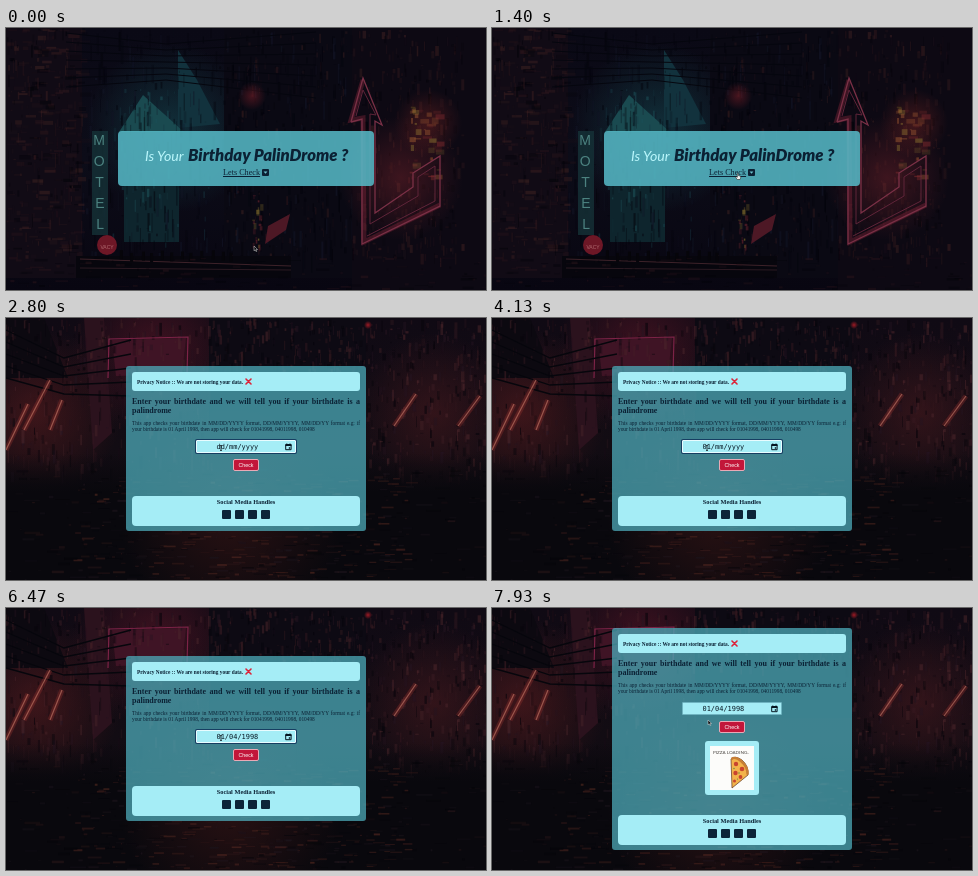
An HTML page with a canvas for the animation above (8 s loop, 480 by 262 pixels).

```html
<!DOCTYPE html>
<html lang="en">
<head>
<meta charset="utf-8">
<title>Birthday palindrome</title>
<style>
html, body { margin: 0; width: 100%; height: 100%; overflow: hidden; background: #0b0a12; }
#stage { position: relative; width: 480px; height: 262px; overflow: hidden; color: #0b2134;
  font: 5.33px/1 "Liberation Serif", serif; }
#stage > *, #panel > * { position: absolute; box-sizing: border-box; }
canvas { left: 0; top: 0; }
#intro { left: 112px; top: 103px; width: 256px; height: 55px; border-radius: 4px; background: rgba(86, 184, 198, .87); }
#intro span { position: absolute; white-space: nowrap; line-height: 1; }
.lead { left: 27px; top: 17.5px; font: italic 14.2px Lato, sans-serif; color: #b9f6fb; }
.name { left: 70px; top: 15.5px; font: italic 900 16.7px Lato, sans-serif; }
.link { left: 105px; top: 38px; font-size: 8.2px; text-decoration: underline; text-decoration-thickness: .7px; }
#intro svg { position: absolute; left: 143.5px; top: 38px; }
#panel { left: 120px; width: 240px; border-radius: 3px; background: rgba(78, 172, 187, .74); }
.light { background: #a5edf6; border-radius: 3px; }
#notice { left: 6px; top: 6px; width: 228px; height: 19px; padding: 7.6px 5px; font-weight: bold; white-space: nowrap; }
#notice svg { position: absolute; left: 112.5px; top: 6.3px; }
h1 { left: 6px; top: 31px; width: 228px; margin: 0; font-size: 8px; line-height: 9px; }
p { left: 6px; top: 54.2px; width: 228px; margin: 0; line-height: 6px; }
.full { display: block; white-space: nowrap; text-align: justify; text-align-last: justify; }
#field { left: 70px; top: 74px; width: 100px; height: 13px; border: .7px solid #6fb4c1; border-radius: 1px; }
#field.focus { border-color: #e8fcff; box-shadow: 0 0 0 1px #173e62; }
#field span { position: absolute; left: 19.5px; top: 2.3px; font: 6.95px/8px "DejaVu Sans Mono", monospace; color: #071722; white-space: pre; }
#field svg { position: absolute; left: 88px; top: 2px; }
#check { left: 107px; top: 93px; width: 26px; height: 12px; border: .7px solid #e9a9b6; border-radius: 2px;
  text-align: center; font: 5.3px/10.6px "Liberation Sans", sans-serif; }
#loader { left: 93px; top: 113px; width: 54px; height: 54px; }
#loader svg { position: absolute; left: 5px; top: 5px; }
#social { left: 6px; bottom: 5px; width: 228px; height: 30px; border-radius: 4px; text-align: center; }
#social b { display: block; margin-top: 3px; font-size: 6.3px; }
#social i { display: inline-block; width: 9.4px; height: 9.4px; margin: 4.8px 1.05px 0; border-radius: 1px; background: #0c2438; }
#status { left: 0; bottom: 0; width: 71px; height: 7px; padding: 1px 2px; background: #292a2e; color: #c8c9cc;
  font: 4.65px/5px "Liberation Sans", sans-serif; white-space: nowrap; }
#cursor { left: 0; top: 0; overflow: visible; }
</style>
</head>
<body>
<div id="stage">
  <canvas id="city" width="480" height="262"></canvas>
  <canvas id="street" width="480" height="262"></canvas>

  <div id="intro">
    <span class="lead">Is Your</span><span class="name">Birthday PalinDrome ?</span>
    <span class="link">Lets Check</span>
    <svg width="7" height="7"><rect width="7" height="7" rx="1" fill="#0b2134"/><path d="M1.6 2.5h3.8L3.5 4.8z" fill="#6fc3cf"/></svg>
  </div>

  <div id="panel">
    <div id="notice" class="light">Privacy Notice :: We are not storing your data.
      <svg width="7" height="7"><path d="M1 1 6 6M6 1 1 6" stroke="#dd2339" stroke-width="1.6" stroke-linecap="round"/></svg>
    </div>
    <h1><span class="full">Enter your birthdate and we will tell you if your birthdate is a</span>palindrome</h1>
    <p><span class="full">This app checks your birthdate in MM/DD/YYYY format, DD/MM/YYYY, MM/DD/YY format e.g: if</span>your birthdate is 01 April 1998, then app will check for 01041998, 04011998, 010498</p>
    <div id="field" class="light"><span id="date"></span>
      <svg width="7" height="8"><path d="M.7 1.5h5.4v5.2H.7zM1.8 .5v1M5 .5v1" fill="none" stroke="#071722"/><path d="M.5 1.5h6v1.6h-6zM3.8 4.3h1.4v1.4H3.8z" fill="#071722"/></svg>
    </div>
    <div id="check">Check</div>
    <div id="loader" class="light">
      <svg width="44" height="44">
        <rect width="44" height="44" fill="#fcfcfa"/>
        <text x="3" y="7.5" font-family="Lato, sans-serif" font-size="4.6" fill="#48433f">PIZZA LOADING..</text>
        <path d="M22 42 21 13Q25 9 32 14 39 20 38 29z" fill="#f3b34b" stroke="#5d3420" stroke-width=".7"/>
        <path d="M21.5 13Q25 10 31 15 38 21 37.5 28.5" fill="none" stroke="#c77e35" stroke-width="2.4"/>
        <g fill="#c8442f"><circle cx="26" cy="18" r="2.2"/><circle cx="32" cy="23" r="2.3"/><circle cx="25.5" cy="27" r="2.2"/><circle cx="30.5" cy="31" r="1.9"/><circle cx="24.5" cy="35" r="1.5"/></g>
        <g fill="#5c8a3a"><circle cx="29" cy="27" r=".7"/><circle cx="24" cy="22.5" r=".7"/><circle cx="27.5" cy="33" r=".6"/></g>
      </svg>
    </div>
    <div id="social" class="light"><b>Social Media Handles</b><i></i> <i></i> <i></i> <i></i></div>
  </div>

  <div id="status">127.0.0.1:5500/index.html#main-2</div>
  <svg id="cursor" width="8" height="8">
    <path id="arrow" d="M0 0v4.8l1.2-1 .8 1.8.9-.4-.8-1.7h1.5z" fill="#0a0a0c" stroke="#eee" stroke-width=".45"/>
    <path id="hand" d="M-.7-1.5q.7-.8 1.1.2v1.9l2 .6q.6.5.2 1.9l-.6 1.4h-2.8L-2.4 2.2q0-.8.8-.4l.9.5z" fill="#f4f4f4" stroke="#111" stroke-width=".5"/>
    <path id="beam" d="M-1-2.6Q0-2.6 0-2 0-2.6 1-2.6M0-2V2M-1 2.6Q0 2.6 0 2 0 2.6 1 2.6" fill="none" stroke="#0a0c10" stroke-width=".8"/>
  </svg>
</div>
<script>
const el = id => document.getElementById(id);
const ink = id => el(id).getContext('2d');

function seeded(seed) {
  return () => (seed = (seed * 16807) % 2147483647) / 2147483647;
}

function box(g, color, x, y, w, h) {
  g.fillStyle = color;
  g.fillRect(x, y, w, h);
}

function trace(g, pts) {
  g.beginPath();
  for (let i = 0; i < pts.length; i += 2) g.lineTo(pts[i], pts[i + 1]);
}

function shape(g, color, pts) {
  trace(g, pts);
  g.fillStyle = color;
  g.fill();
}

function line(g, color, width, pts) {
  trace(g, pts);
  g.strokeStyle = color;
  g.lineWidth = width;
  g.stroke();
}

function glow(g, rgb, alpha, x, y, r) {
  const fade = g.createRadialGradient(x, y, 0, x, y, r);
  fade.addColorStop(0, `rgba(${rgb},${alpha})`);
  fade.addColorStop(1, `rgba(${rgb},0)`);
  box(g, fade, x - r, y - r, 2 * r, 2 * r);
}

function wash(g, top, middle, bottom) {
  const fade = g.createLinearGradient(0, 0, 0, 262);
  [top, middle, bottom].forEach((c, i) => fade.addColorStop(i / 2, c));
  box(g, fade, 0, 0, 480, 262);
}

// Scattered strokes that give a wall or floor its rough surface.
function grain(g, rnd, count, colors, [x, y, w, h], sx, sy) {
  for (let i = 0; i < count; i++) {
    g.globalAlpha = .15 + rnd() * .45;
    box(g, colors[Math.floor(rnd() * colors.length)], x + rnd() * w, y + rnd() * h, .6 + rnd() * sx, .6 + rnd() * sy);
  }
  g.globalAlpha = 1;
}

function drawCity() {
  const g = ink('city'), rnd = seeded(71);
  wash(g, '#0a0915', '#0c0c18', '#080611');
  glow(g, '20,66,76', .65, 165, 100, 85);
  shape(g, '#12323d', [172, 22, 191, 52, 214, 96, 172, 100]);
  shape(g, '#1a4a50', [113, 104, 137, 67, 178, 104]);
  box(g, '#0e252d', 118, 158, 55, 56);
  box(g, '#0a0913', 218, 0, 128, 250);
  box(g, '#110b15', 0, 0, 76, 250);
  box(g, '#0d0913', 346, 0, 134, 262);

  const night = ['#04040b', '#05060f', '#131627'], brick = ['#04040a', '#2c161b', '#1d1119', '#3a1f20'];
  grain(g, rnd, 520, night, [76, 0, 270, 228], 2, 22);
  grain(g, rnd, 90, ['#1c5058', '#173642', '#090b15'], [104, 60, 100, 155], 2, 14);
  grain(g, rnd, 300, brick, [0, 0, 76, 228], 11, 4);
  grain(g, rnd, 130, brick, [0, 0, 76, 228], 1.5, 14);
  grain(g, rnd, 380, brick, [346, 0, 110, 230], 3, 11);
  grain(g, rnd, 230, brick, [218, 0, 125, 228], 2, 9);
  for (let i = 0; i < 7; i++) line(g, '#05060e', 1, [60, 5 + i * 9, 160, 16 + i * 6, 310, 4 + i * 11]);

  glow(g, '110,28,38', .6, 246, 68, 14);
  shape(g, '#4d1825', [262, 198, 284, 186, 280, 202, 259, 216]);
  grain(g, rnd, 22, ['#8d762f', '#7a2733'], [246, 165, 9, 55], 3, 6);
  glow(g, '120,36,44', .45, 395, 150, 62);
  glow(g, '140,42,38', .4, 422, 95, 34);
  grain(g, rnd, 42, ['#8c7430', '#7d2a2e', '#91522f'], [402, 78, 30, 74], 9, 6);
  line(g, 'rgba(150,40,65,.35)', 5, [357, 52, 345, 92, 357, 90, 358, 214, 434, 177]);
  line(g, '#7a3046', 1.3, [345, 94, 357, 50, 376, 97, 369, 93, 369, 185, 407, 159, 407, 145, 434, 128, 434, 178, 356, 216, 356, 91, 345, 94]);
  line(g, '#5f2439', 1, [350, 88, 357, 62, 370, 87, 364, 86, 364, 196, 412, 168, 412, 149, 429, 138, 429, 173, 361, 208]);

  box(g, 'rgba(22,52,58,.75)', 86, 103, 16, 104);
  g.fillStyle = '#4c8280';
  g.font = '14px "Liberation Sans", sans-serif';
  g.textAlign = 'center';
  [...'MOTEL'].forEach((c, i) => g.fillText(c, 93 + i * .3, 117 + i * 21));
  g.beginPath();
  g.arc(101, 217, 10, 0, 7);
  g.fillStyle = '#6d1726';
  g.fill();
  g.fillStyle = '#b06a70';
  g.font = '5px "Liberation Sans", sans-serif';
  g.fillText('VACY', 101, 221);

  box(g, '#07060d', 70, 228, 215, 22);
  line(g, '#3d2229', 1, [74, 231, 285, 238]);
  line(g, '#2b1a22', 1, [74, 240, 285, 242]);
  for (let i = 0; i < 12; i++) box(g, '#06050a', 112 + i * 10 + rnd() * 5, 222 + rnd() * 3, 3, 9);
  grain(g, rnd, 120, ['#27131a', '#04040a'], [0, 228, 480, 34], 14, 2);
}

function drawStreet() {
  const g = ink('street'), rnd = seeded(29);
  wash(g, '#100a14', '#120c13', '#08070d');
  glow(g, '100,24,42', .55, 150, 32, 85);
  glow(g, '90,28,30', .6, 30, 95, 85);
  glow(g, '82,28,32', .5, 428, 95, 80);
  shape(g, '#0c0910', [0, 0, 38, 0, 62, 60, 0, 60]);
  shape(g, '#2b121d', [78, 0, 98, 0, 106, 115, 87, 132]);
  shape(g, '#3f1425', [106, 22, 180, 20, 176, 56, 110, 58]);
  box(g, '#0d0a13', 203, 0, 157, 110);

  const wall = ['#06050b', '#3a1c22', '#241420', '#4a252a'];
  grain(g, rnd, 420, wall, [0, 0, 205, 155], 2.5, 13);
  grain(g, rnd, 260, wall, [205, 0, 155, 60], 2.5, 10);
  grain(g, rnd, 380, wall, [360, 0, 120, 160], 3, 11);
  line(g, '#7c2347', 1.2, [102, 60, 103, 21, 182, 19, 181, 56]);
  for (let i = 0; i < 5; i++) line(g, '#06060c', 1.3, [0, 12 + i * 12, 58, 40 + i * 9, 125, 22 + i * 14]);

  const lamps = [[44, 62, 18, 112], [22, 86, 0, 132], [56, 82, 44, 112], [410, 76, 388, 108], [474, 78, 452, 108]];
  lamps.forEach(p => {
    line(g, 'rgba(150,50,46,.35)', 5, p);
    line(g, 'rgba(185,110,95,.7)', 1.2, p);
  });
  glow(g, '190,30,40', .8, 362, 7, 4);

  const floor = g.createLinearGradient(0, 135, 0, 175);
  floor.addColorStop(0, 'rgba(9,8,13,0)');
  floor.addColorStop(1, '#09080d');
  box(g, floor, 0, 135, 480, 127);
  glow(g, '78,28,26', .45, 225, 200, 110);
  grain(g, rnd, 420, ['#47211d', '#06060b', '#221820', '#5a2b22'], [60, 155, 340, 105], 12, 1.5);
  grain(g, rnd, 200, ['#1b151d', '#050509', '#2c1719'], [0, 150, 480, 112], 16, 2);
}

const CLICK_LINK = 1800, GROW = 7530;

const cursorPath = [
  [0, 248, 218], [300, 248, 218], [1150, 246, 147], [2400, 246, 147], [2740, 215, 130],
  [6800, 215, 130], [7180, 249, 148], [7600, 249, 148], [7930, 216, 112], [8000, 216, 112]
];
const cursorKinds = [[0, 'arrow'], [1110, 'hand'], [2520, 'arrow'], [2670, 'beam'], [6900, 'arrow'], [7000, 'hand'], [GROW, 'arrow']];
const dates = [
  [0, 'dd/mm/yyyy'], [3470, '00/mm/yyyy'], [3870, '01/mm/yyyy'], [4600, '01/00/yyyy'], [5130, '01/04/yyyy'],
  [5930, '01/04/0001'], [6070, '01/04/0019'], [6270, '01/04/0199'], [6470, '01/04/1998']
];

const during = (t, from, to) => t >= from && t < to;
const latest = (steps, t) => steps.filter(s => s[0] <= t).pop()[1];
const show = (id, on) => { el(id).style.display = on ? 'block' : 'none'; };

function along(path, t) {
  const i = path.findIndex((p, n) => n && t <= p[0]);
  const [t0, x0, y0] = path[i - 1], [t1, x1, y1] = path[i];
  const k = (t - t0) / (t1 - t0), e = k * k * (3 - 2 * k);
  return [x0 + (x1 - x0) * e, y0 + (y1 - y0) * e];
}

function paintButton(t) {
  const entered = during(t, CLICK_LINK, 2520) ? CLICK_LINK : during(t, 7000, GROW) ? 7000 : null;
  const k = entered === null ? 0 : Math.min(1, (t - entered) / 300);
  const mix = (a, b) => Math.round(a + (b - a) * k * k);
  const style = el('check').style;
  style.background = `rgb(${mix(194, 251)},${mix(22, 232)},${mix(58, 235)})`;
  style.borderColor = entered === null ? '#e9a9b6' : `rgb(${mix(181, 240)},${mix(29, 170)},${mix(60, 182)})`;
  style.color = entered === null ? '#fff' : '#14141c';
}

function render(t) {
  const intro = t < CLICK_LINK, grown = t >= GROW;
  show('city', intro);
  show('intro', intro);
  show('street', !intro);
  show('panel', !intro);
  show('loader', grown);
  show('status', during(t, 1500, 2400));
  el('panel').style.top = grown ? '20px' : '48px';
  el('panel').style.height = grown ? '222px' : '165px';
  el('field').classList.toggle('focus', during(t, 2800, 7270));
  el('date').textContent = latest(dates, t);
  paintButton(t);

  const kind = latest(cursorKinds, t), [x, y] = along(cursorPath, t);
  ['arrow', 'hand', 'beam'].forEach(k => show(k, k === kind));
  el('cursor').style.transform = `translate(${x}px,${y}px)`;
}

drawCity();
drawStreet();
const start = performance.now();
function tick() {
  render((performance.now() - start) % 8000);
  requestAnimationFrame(tick);
}
tick();
</script>
</body>
</html>
```
